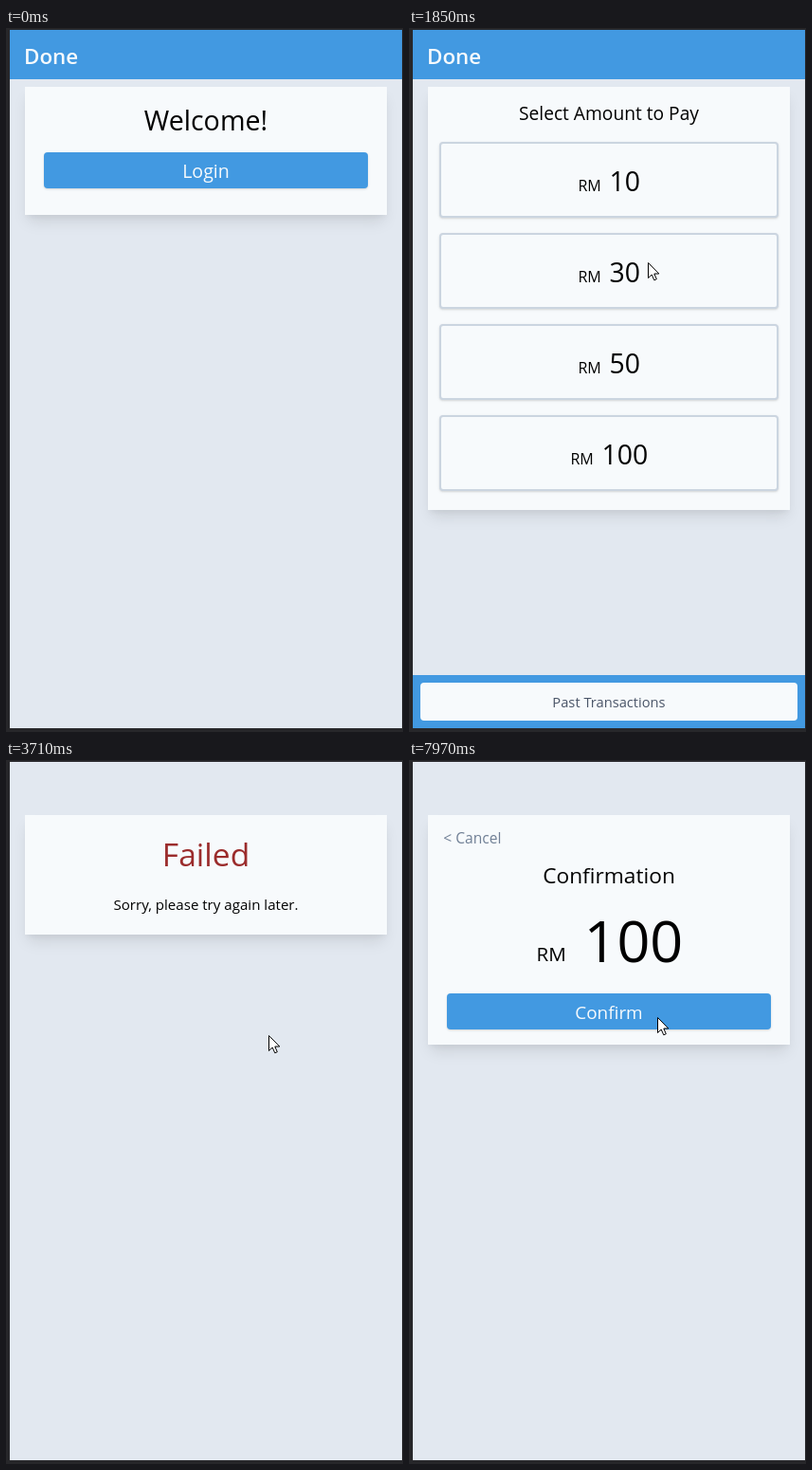
These frames come from a looping animation (419x742 px, 8 s). An HTML page:

```html
<!DOCTYPE html>
<html lang="en">
<head>
<meta charset="utf-8">
<title>Payment flow</title>
<style>
html, body { margin: 0; width: 100%; height: 100%; overflow: hidden; background: #27272a; }
#app { position: absolute; left: 4px; top: 2px; width: 414px; height: 736px; background: #e2e8f0; }
#stage, .screen, svg { position: absolute; left: 0; top: 0; width: 419px; height: 742px; }
.screen div { position: absolute; box-sizing: border-box; }
.card { background: #f7fafc; box-shadow: 0 10px 15px -3px rgba(0,0,0,.1), 0 4px 6px -2px rgba(0,0,0,.05); }
.bar { background: #4299e1; }
.button { background: #4299e1; border-radius: 4px; box-shadow: 0 1px 3px rgba(0,0,0,.1), 0 1px 2px rgba(0,0,0,.06); }
.option { background: #f7fafc; border: 2px solid #cbd5e0; border-radius: 4px; box-shadow: 0 1px 3px rgba(0,0,0,.1), 0 1px 2px rgba(0,0,0,.06); }
.plain { background: #f7fafc; border-radius: 4px; }
text { font-family: "Open Sans", "Noto Sans", sans-serif; white-space: pre; }
</style>
</head>
<body>
<div id="app"></div>
<div id="stage"></div>
<svg>
  <g id="cursor">
    <path d="M.5 .5V16.5L4.2 13L6.8 18.8L9.3 17.7L6.8 12H11.8Z" fill="#fff" stroke="#000"/>
    <circle id="press" r="12" fill="#ff0" fill-opacity=".5"/>
  </g>
</svg>
<script>
const $ = id => document.getElementById(id);
const box = (kind, x, y, w, h) =>
  `<div class="${kind}" style="left:${x}px;top:${y}px;width:${w}px;height:${h}px"></div>`;
const text = (s, x, y, size, fill = "#000", extra = "") =>
  `<text x="${x}" y="${y}" font-size="${size}" fill="${fill}" ${extra}>${s}</text>`;
const mid = (s, y, size, fill) => text(s, 211, y, size, fill, 'text-anchor="middle"');
const screen = (id, boxes, texts = "") =>
  `<div class="screen" id="${id}">${boxes}<svg>${texts}</svg></div>`;

const header = box("bar", 4, 2, 414, 52);
const title = text("Done", 19, 38, 22.4, "#f7fafc", 'font-weight="600"');

const amounts = [10, 30, 50, 100];
const option = (n, i) => {
  const shift = n > 99 ? 8 : 0, y = 172 + 96 * i;
  return text("RM", 178.4 - shift, y, 16) + text(n, 211.5 - shift, y, 28.4);
};

const confirmScreen = (id, n, rmX, numX) => screen(id,
  box("card", 20, 58, 382, 242) + box("button", 40, 246, 342, 38),
  text("&lt; Cancel", 36.3, 88, 15.6, "#718096") + mid("Confirmation", 130, 22.7) +
  text("RM", rmX, 212, 20.6) + text(n, numX, 213, 61) + mid("Confirm", 273, 18.9, "#f7fafc"));

$("stage").innerHTML =
  screen("welcome",
    header + box("card", 20, 62, 382, 135) + box("button", 40, 131, 342, 38),
    title + mid("Welcome!", 108, 28.6) + mid("Login", 158, 19.6, "#f7fafc")) +
  screen("select",
    header + box("card", 20, 62, 382, 446) +
    amounts.map((n, i) => box("option", 32, 120 + 96 * i, 358, 80)).join("") +
    box("bar", 4, 682, 414, 56) + box("plain", 12, 690, 398, 40),
    title + mid("Select Amount to Pay", 97, 19.2) + amounts.map(option).join("") +
    mid("Past Transactions", 716, 14.7, "#4a5568")) +
  confirmScreen("confirm30", 30, 151.5, 201) +
  confirmScreen("confirm100", 100, 134.5, 184.5) +
  screen("pending", box("card", 20, 58, 382, 126)) +
  screen("failed", box("card", 20, 58, 382, 126),
    mid("Failed", 112, 33.6, "#9b2c2c") + mid("Sorry, please try again later.", 158, 15.1));

const scenes = [[0, "welcome"], [900, "select"], [1920, "confirm30"], [2850, "pending"],
  [3470, "failed"], [6740, "select"], [7590, "confirm100"]];

// Cursor moves: start, end, steps, target x, target y
const moves = [
  [70, 830, 11, 244, 137], [1070, 1850, 11, 252, 247], [2320, 2470, 3, 255, 265],
  [2770, 3390, 9, 277, 284], [3470, 3710, 4, 277, 290],
  [7040, 7440, 6, 251, 447], [7820, 7970, 3, 262, 271]];
const presses = [[755, 830], [2620, 2770], [7360, 7440]];

function cursorAt(t) {
  let x = 296, y = 699;
  for (const [start, end, steps, tx, ty] of moves) {
    if (t < start) break;
    const k = Math.floor((t - start) / (end - start) * (steps - 1) + 1e-6);
    const p = Math.min(1, (k + 1) / steps), ease = 1 - (1 - p) ** 2;
    x += (tx - x) * ease;
    y += (ty - y) * ease;
  }
  return [Math.round(x), Math.round(y)];
}

const show = (el, on) => { el.style.display = on ? "" : "none"; };
const screens = document.querySelectorAll(".screen");
const begin = performance.now();

function draw() {
  const t = (performance.now() - begin) % 8000;
  const current = scenes.filter(s => s[0] <= t).pop()[1];
  screens.forEach(el => show(el, el.id === current));
  show($("cursor"), t >= 70);
  $("cursor").setAttribute("transform", `translate(${cursorAt(t)})`);
  show($("press"), presses.some(([a, b]) => t >= a && t < b));
  requestAnimationFrame(draw);
}
draw();
</script>
</body>
</html>
```
